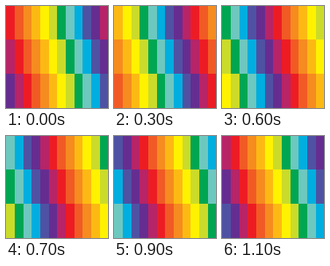
These frames come from a looping animation (128x128 px, 1200 ms). An HTML page with a canvas:

```html
<!DOCTYPE html>
<html lang="en">
<head>
<meta charset="utf-8">
<title>Rainbow bars</title>
<style>
  html, body { margin: 0; width: 100%; height: 100%; overflow: hidden; }
  canvas { display: block; width: 128px; height: 128px; }
</style>
</head>
<body>
<canvas id="stage" width="128" height="128"></canvas>
<script>
  const SIZE = 128;
  const STEP_MS = 100;
  const COLORS = [
    '#b72467', '#ed1c24', '#f15a24', '#f68b1f', '#fdb913', '#fff200',
    '#cbdb2a', '#00a651', '#6dc8bf', '#00aedf', '#4f52a3', '#662d91'
  ];
  // Colour offset of each row, top to bottom
  const ROWS = [1, 0, -1];
  const count = COLORS.length;
  const ctx = document.getElementById('stage').getContext('2d');
  const colEdge = i => Math.ceil(i * SIZE / count);
  const rowEdge = i => Math.floor(i * SIZE / ROWS.length);

  function draw(step) {
    ROWS.forEach((offset, row) => {
      const top = rowEdge(row);
      const height = rowEdge(row + 1) - top;
      for (let col = 0; col < count; col++) {
        const left = colEdge(col);
        ctx.fillStyle = COLORS[(col + step + offset + count) % count];
        ctx.fillRect(left, top, colEdge(col + 1) - left, height);
      }
    });
  }

  const start = performance.now();
  function tick() {
    const elapsed = performance.now() - start;
    draw(Math.floor(elapsed / STEP_MS) % count);
    requestAnimationFrame(tick);
  }
  tick();
</script>
</body>
</html>
```
